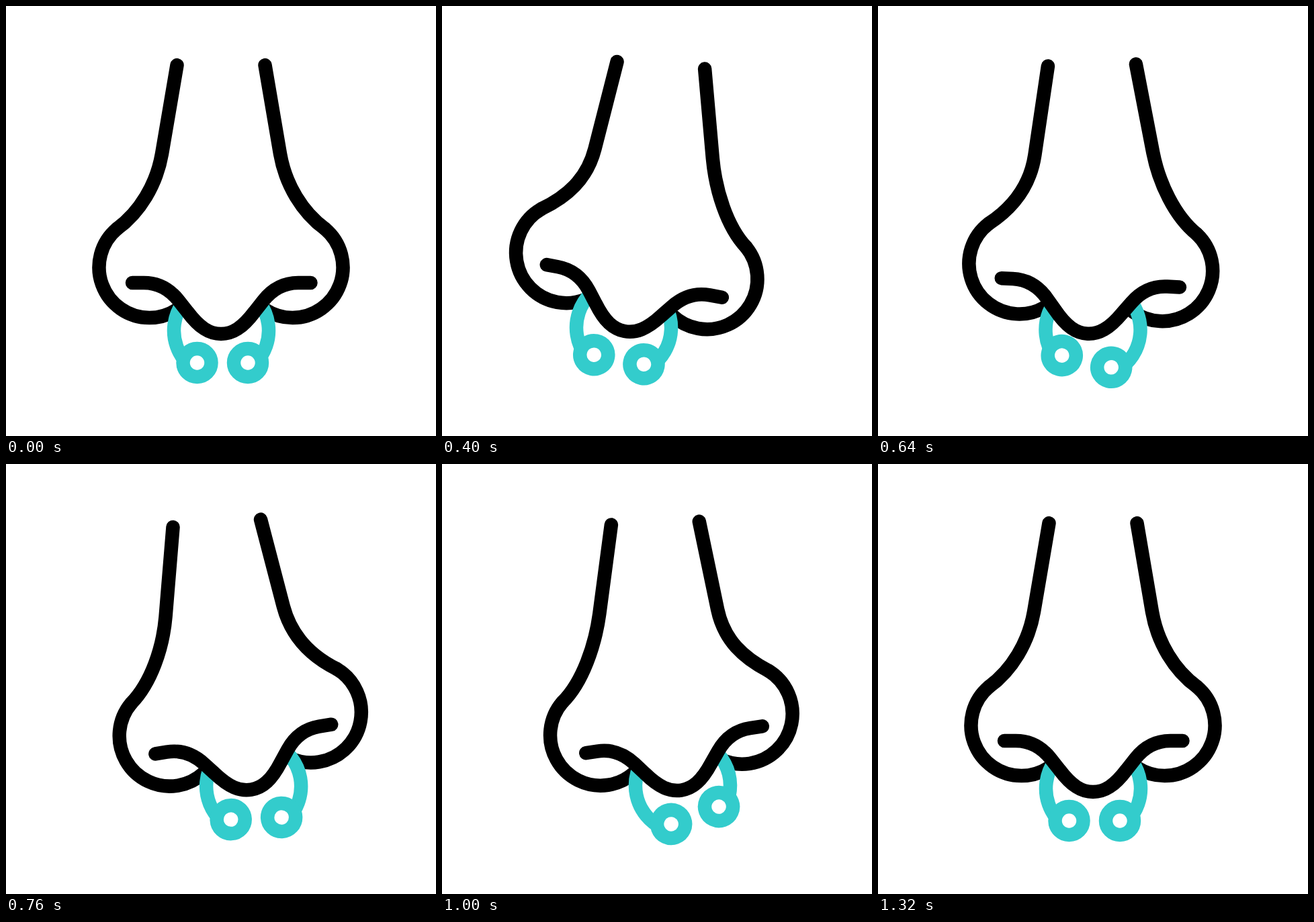
These frames come from a looping animation (640 by 640 pixels, 1.44 s). An HTML page:

```html
<!DOCTYPE html>
<html lang="en">
<head>
<meta charset="utf-8">
<title>Nose with ring</title>
<style>
  html, body { margin: 0; width: 100%; height: 100%; overflow: hidden; background: #fff; }
  svg { display: block; width: 100vw; height: 100vh; }
  path, circle { fill: none; stroke: #000; stroke-width: 20.5; stroke-linecap: round; stroke-linejoin: round; }
  #ring path { stroke: #3cc; stroke-linecap: butt; }
  #ring circle { stroke: #3cc; fill: #fff; }
</style>
</head>
<body>
<svg viewBox="0 0 640 640">
  <defs>
    <clipPath id="below">
      <path class="tip" d="M188 412H205C226 412 244 422 257 438.5L270 455C288 479 303 488 320 488S352 479 370 455L383 438.5C396 422 414 412 435 412H452L640 700H0Z"/>
    </clipPath>
  </defs>
  <path id="left"/>
  <path id="right"/>
  <g class="tip">
    <path id="nostril" d="M165 331.8A75 75 0 0 0 213.5 464A75 75 0 0 0 254 452.1"/>
    <use href="#nostril" transform="translate(640) scale(-1 1)"/>
  </g>
  <g clip-path="url(#below)">
    <g id="ring">
      <path d="M-35.2 -61.1A70.5 70.5 0 0 0 -50.5 49.2M35.2 -61.1A70.5 70.5 0 0 1 50.5 49.2"/>
      <circle cx="-36" cy="48" r="21"/>
      <circle cx="39.5" cy="48" r="21"/>
    </g>
  </g>
  <path class="tip" d="M188 412H205C226 412 244 422 257 438.5L270 455C288 479 303 488 320 488S352 479 370 455L383 438.5C396 422 414 412 435 412H453.5"/>
</svg>
<script>
  const LOOP = 1440, STEP = 40, MID = 320;
  const BRIDGE_Y = 160, TIP_Y = 275;
  const $ = id => document.getElementById(id);
  const tips = document.querySelectorAll(".tip");
  const deg = rad => rad * 180 / Math.PI;

  function ease(t, from, to) {
    const u = Math.min(1, Math.max(0, (t - from) / (to - from)));
    return u * u * (3 - 2 * u);
  }

  // Rest, one way, the other way, rest again.
  const sway = (t, start, peak, dip, end, up, down = -up) =>
    up * ease(t, start, peak) + (down - up) * ease(t, peak, dip) - down * ease(t, dip, end);

  function turn([x, y], angle, pivotY) {
    const c = Math.cos(angle), s = Math.sin(angle), dx = x - MID, dy = y - pivotY;
    return [MID + dx * c - dy * s, pivotY + dx * s + dy * c];
  }

  function draw(t) {
    const bridge = sway(t, 80, 460, 768, 1190, 0.087);
    const tip = sway(t, 160, 532, 862, 1320, 0.145);
    const upper = p => turn(p, bridge, BRIDGE_Y);
    const lower = p => upper(turn(p, tip, TIP_Y));

    // The cheek bends between the bridge and the tip.
    const side = dir => {
      const at = (move, dx, y) => move([MID + dir * dx, y]).map(v => v.toFixed(2)).join(" ");
      return `M${at(upper, 65.5, 88)}L${at(upper, 88, 220)}` +
        `C${at(upper, 96, 266)} ${at(lower, 121, 307)} ${at(lower, 155, 331.8)}`;
    };
    $("left").setAttribute("d", side(-1));
    $("right").setAttribute("d", side(1));

    const pose = `rotate(${deg(bridge)} ${MID} ${BRIDGE_Y}) rotate(${deg(tip)} ${MID} ${TIP_Y})`;
    tips.forEach(el => el.setAttribute("transform", pose));

    const x = sway(t, 95, 470, 812, 1320, -55);
    const swing = sway(t, 110, 584, 940, 1320, 0.28, -0.375);
    const y = 483 - x * x / 700 - 20 * swing * swing;
    $("ring").setAttribute("transform", `translate(${MID + 0.5 + x} ${y}) rotate(${deg(swing)})`);
  }

  const start = performance.now();
  function tick() {
    const t = (performance.now() - start) % LOOP;
    draw(Math.floor(t / STEP) * STEP);
    requestAnimationFrame(tick);
  }
  draw(0);
  requestAnimationFrame(tick);
</script>
</body>
</html>
```
